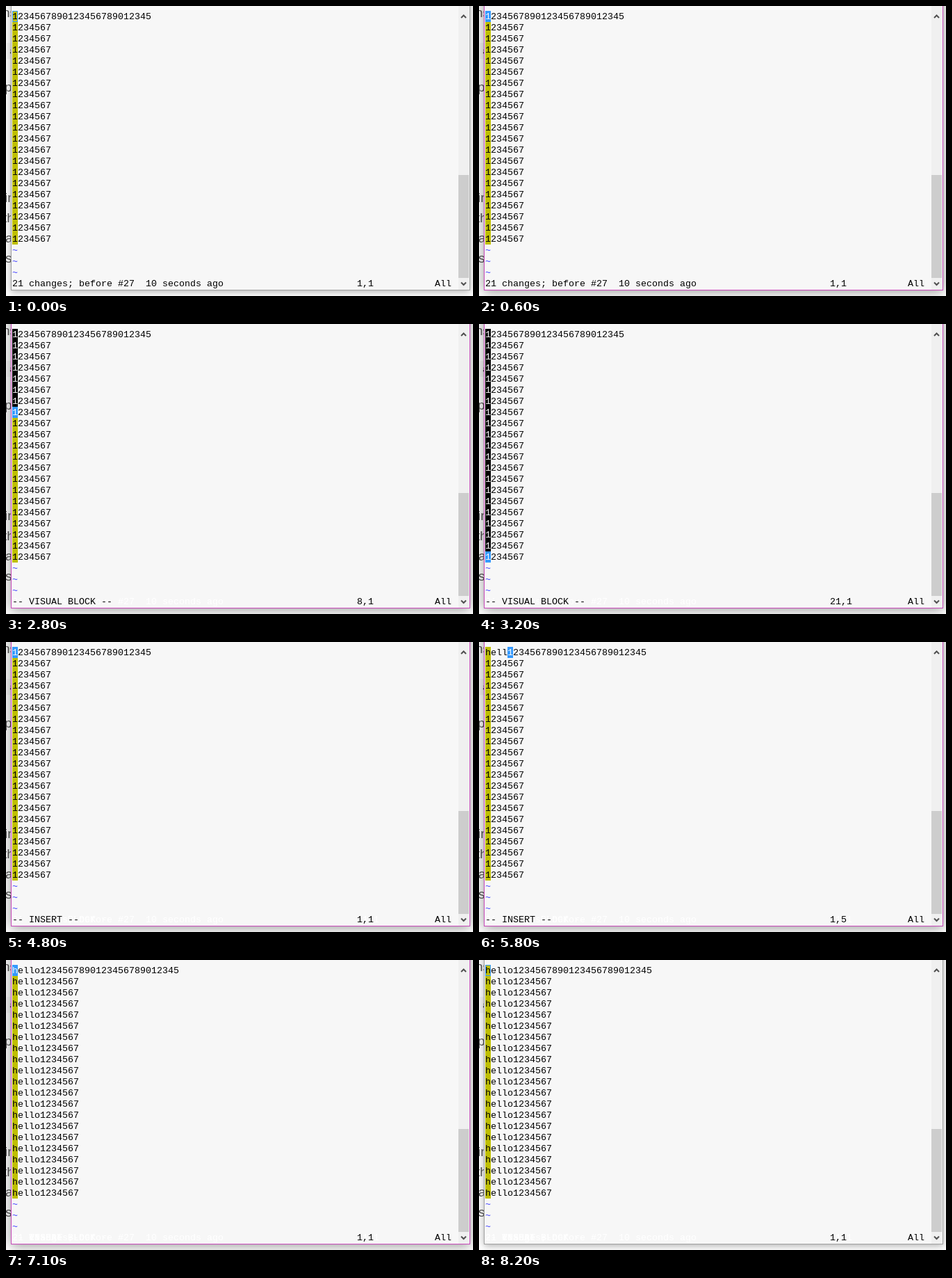
These frames come from a looping animation (672 px wide and 417 px high, 8.3 s). An HTML page with a canvas:

```html
<!DOCTYPE html>
<html lang="en">
<head>
<meta charset="utf-8">
<style>
html, body { margin: 0; width: 100%; height: 100%; overflow: hidden; background: #fff; }
canvas { display: block; }
</style>
</head>
<body>
<canvas width="672" height="417"></canvas>
<script>
const ctx = document.querySelector('canvas').getContext('2d');
const LOOP = 8300, LEFT = 9, TOP = 7, CELL = 8, LINE = 16, ROWS = 21, STATUS = 24;
const MONO = '13.333px "Liberation Mono", "Courier New", monospace';
const SANS = '19px "Liberation Sans", Arial, sans-serif';
const PAPER = '#f7f7f7', BLUE = '#3399ff', OLIVE = '#bfbf00';
const UNDO = '21 changes; before #27  10 seconds ago';
const VISUAL = '-- VISUAL BLOCK --', INSERT = '-- INSERT --';

function rect(x, y, w, h, color) {
  ctx.fillStyle = color;
  ctx.fillRect(x, y, w, h);
}

function label(text, x, y, color, font) {
  ctx.font = font;
  ctx.fillStyle = color;
  ctx.fillText(text, x, y);
}

function put(text, row, col, color = '#000') {
  label(text, LEFT + col * CELL, TOP + row * LINE + 12, color, MONO);
}

function block(row, col, color) {
  rect(LEFT + col * CELL, TOP + row * LINE, CELL, LINE, color);
}

function chevron(y, dir) {
  ctx.strokeStyle = '#505050';
  ctx.lineWidth = 2;
  ctx.beginPath();
  ctx.moveTo(655, y + 2 * dir);
  ctx.lineTo(658.5, y - 1.5 * dir);
  ctx.lineTo(662, y + 2 * dir);
  ctx.stroke();
}

function drawPage() {
  rect(0, 0, 672, 417, '#fff');
  rect(1, 53, 7, 23, '#f6f6f6');
  const words = [['ns', -5, 16], ['p', -2, 123], ['in', -2, 282],
    ['the', -4, 311], ['a', -1, 340], ['s', -1, 369]];
  for (const [text, x, y] of words) label(text, x, y, '#555', SANS);
  label('a', 5, 69, '#555', MONO);
}

function drawWindow(focused) {
  ctx.save();
  ctx.shadowColor = focused ? 'rgba(0,0,0,.42)' : 'rgba(0,0,0,.32)';
  ctx.shadowBlur = focused ? 16 : 10;
  ctx.shadowOffsetY = 2;
  rect(7, -30, 661, 439, focused ? '#c748b9' : '#a0a0a0');
  ctx.restore();
  rect(8, 0, 659, 408, PAPER);
  rect(651, 0, 16, 408, '#f0f0f0');
  rect(651, 243, 15, 148, '#cdcdcd');
  chevron(15, 1);
  chevron(399.5, -1);
}

// Editor state as a function of loop time
function stateAt(t) {
  const visual = t >= 1800 && t < 4800;
  const done = t >= 7100;
  let row = 0;
  if (visual && t >= 2200) {
    const step = Math.max(0, Math.min(6, Math.floor((t - 2600) / 100)));
    row = Math.round(1 + step * 19 / 6);
  }
  const typed = t >= 6000 ? 5 : Math.max(0, Math.min(4, Math.floor((t - 5400) / 100)));
  const col = done ? 0 : t >= 6200 ? 4 : typed;
  const status = t < 1800 ? UNDO : visual ? VISUAL : t < 6200 ? INSERT : '';
  return { visual, done, row, col, typed, status,
    focused: t >= 600 && t < 8200, ruler: t < 6200 || done };
}

// Erased status text leaves faint white traces
function drawTraces(t) {
  const trace = (text, col) => put(text, STATUS, col, '#fff');
  if (t >= 1800) trace(UNDO, 0);
  if (t >= 4800) {
    trace(VISUAL, 0);
    trace('21,1', 62);
  }
  if (t >= 6200) {
    trace(INSERT, 0);
    trace('1,6', 62);
    trace('All', 76);
  }
}

function draw(t) {
  const s = stateAt(t);
  drawPage();
  drawWindow(s.focused);

  for (let r = 0; r < ROWS; r++) {
    const digits = r ? '1234567' : '1234567890123456789012345';
    const text = 'hello'.slice(0, r && !s.done ? 0 : s.typed) + digits;
    const selected = s.visual && r < s.row;
    block(r, 0, selected ? '#000' : OLIVE);
    put(text, r, 0);
    if (selected) put(text[0], r, 0, PAPER);
    if (r !== s.row) continue;
    if (s.focused) {
      block(r, s.col, BLUE);
      put(text[s.col], r, s.col, PAPER);
    } else {
      ctx.strokeStyle = BLUE;
      ctx.lineWidth = 1;
      ctx.strokeRect(LEFT + .5, TOP + .5, CELL - 1, LINE - 1);
    }
  }
  for (let r = ROWS; r < STATUS; r++) put('~', r, 0, '#4040ff');

  drawTraces(t);
  put(s.status, STATUS, 0);
  if (s.ruler) {
    put(`${s.row + 1},${s.col + 1}`, STATUS, 62);
    put('All', STATUS, 76);
  }
}

const start = performance.now();
function tick() {
  draw((performance.now() - start) % LOOP);
  requestAnimationFrame(tick);
}
tick();
</script>
</body>
</html>
```
